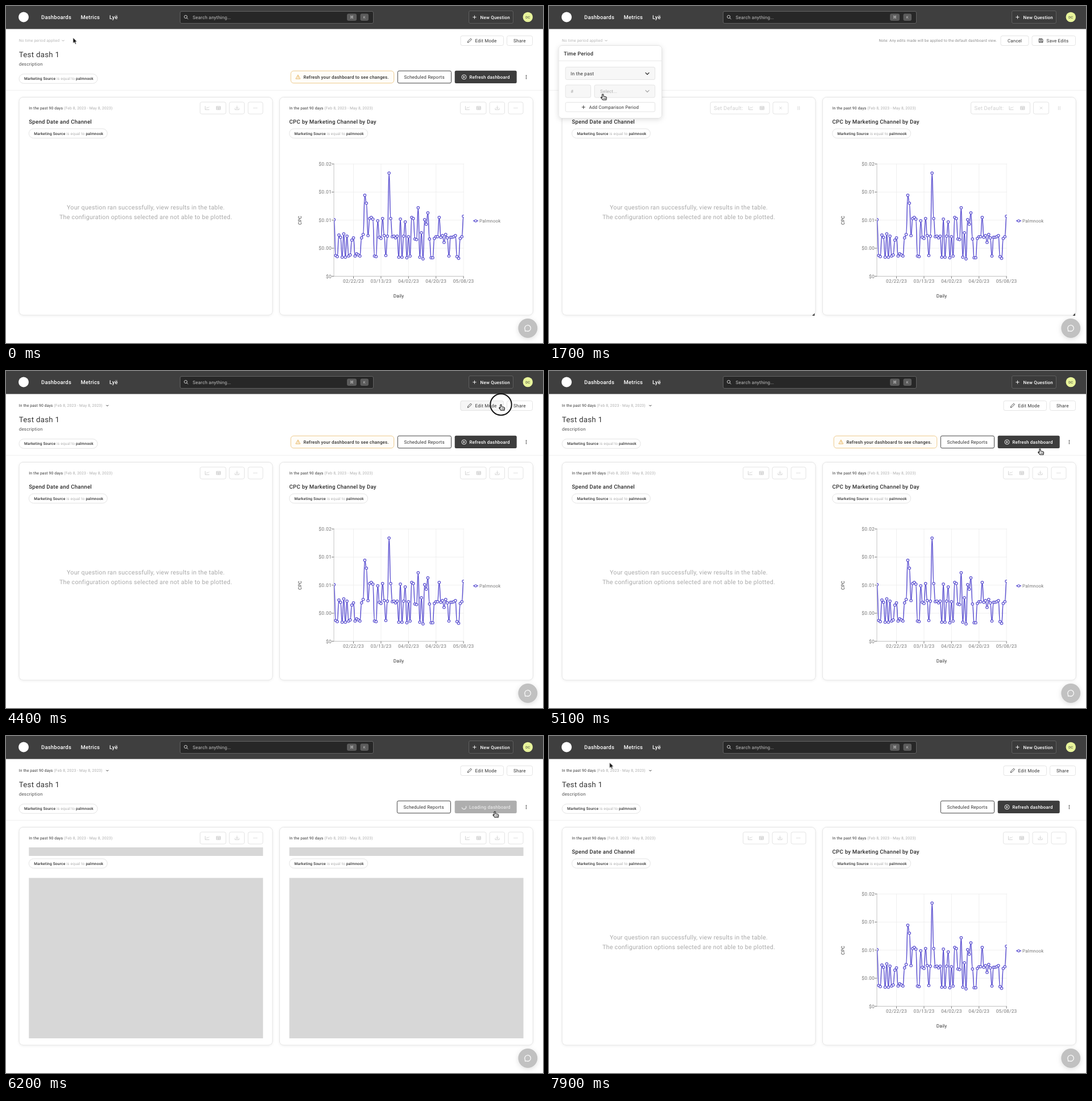
An HTML page for the animation above (8 s loop, 945 px wide and 593 px high).

```html
<!DOCTYPE html>
<html lang="en">
<head>
<meta charset="utf-8">
<title>Dashboard time period</title>
<style>
html, body { margin: 0; width: 100%; height: 100%; overflow: hidden; background: #fff; }
svg { display: block; width: 945px; height: 593px; font-family: Roboto, Inter, sans-serif; text-rendering: geometricPrecision; }
text { letter-spacing: .025em; }
.m { font-weight: 500; }
.soft { fill: #acacac; font-weight: 400; }
.line { fill: none; stroke-linecap: round; stroke-linejoin: round; }
#cursor { animation: travel 8s linear infinite; }
#reports { animation: nudge 8s step-end infinite; }
#spin { animation: spin 1s linear infinite; transform-origin: 806px 125px; }
@keyframes spin { to { transform: rotate(360deg); } }
@keyframes nudge {
  77.5% { transform: translate(-1px, 0); }
  87.5% { transform: none; }
}
@keyframes travel {
  0% { transform: translate(114px, 55.5px); }
  1.25% { transform: translate(500px, 58px); }
  2.5%, 3.75% { transform: translate(845px, 60px); }
  5% { transform: translate(300px, 60px); }
  6.25%, 11.25% { transform: translate(98px, 62px); }
  13.75%, 16.25% { transform: translate(110px, 118px); }
  18.75% { transform: translate(100px, 142px); }
  21.25% { transform: translate(95px, 155px); }
  22.5%, 28.75% { transform: translate(57px, 151px); }
  30%, 31.25% { transform: translate(120px, 151px); }
  33.75%, 36.25% { transform: translate(112px, 176px); }
  37.5% { transform: translate(300px, 140px); }
  41.25% { transform: translate(906px, 65px); }
  42.5%, 48.75% { transform: translate(912px, 62px); }
  53.75%, 58.75% { transform: translate(871px, 59px); }
  63.75% { transform: translate(864px, 137px); }
  66.25%, 77.5% { transform: translate(862px, 133px); }
  82.5%, 96.25% { transform: translate(151px, 97px); }
  97.5% { transform: translate(168px, 68px); }
  98.75%, 100% { transform: translate(106.5px, 46.5px); }
}
</style>
</head>
<body>
<script>
const LOOP = 8000;
const INK = '#333', PALE = '#c9c9c9', EDGE = '#e4e4e4', PLOT = '#5a4fd0';

// Visible time spans in ms for each layer
const ready = [[0, 300], [3900, 6200], [7000, LOOP]];
const spans = {
  noPeriod: [[0, 3000]],
  period: [[3000, LOOP]],
  view: [[0, 300], [3900, LOOP]],
  edit: [[300, 3900]],
  notice: [[0, 300], [3900, 6200]],
  readyBack: ready,
  readyLabel: ready,
  loading: [[6200, 7000]],
  editHover: [[4000, 4800]],
  refreshHover: [[5800, 6200]],
  leftLoad: [[6200, 6900]],
  rightLoad: [[6200, 6700]],
  popShort: [[700, 1500]],
  popFull: [[1500, 3000]],
  modeMenu: [[1200, 1500]],
  unitMenu: [[2400, 2700]],
  hash: [[1500, 2100]],
  nine: [[2100, 2200]],
  ninety: [[2200, 3000]],
  noUnit: [[1500, 2700]],
  unit: [[2700, 3000]],
  arrow: [[0, 200], [7800, LOOP]],
  hand: [[200, 7800]],
  ring: [[200, 300], [500, 700], [3400, 3700], [4300, 4700], [5800, 6200]],
};

function visibilityRule([id, list]) {
  const at = (ms, on) => `${ms / LOOP * 100}%{visibility:${on ? 'visible' : 'hidden'}}`;
  let frames = list[0][0] ? at(0, false) : '';
  for (const [from, to] of list) frames += at(from, true) + (to < LOOP ? at(to, false) : '');
  return `@keyframes ${id}{${frames}}#${id}{animation:${id} ${LOOP}ms step-end infinite}`;
}

const layer = (id, ...parts) => `<g id="${id}">${parts.join('')}</g>`;
const text = (x, mid, size, str, fill = INK, more = '') =>
  `<text x="${x}" y="${mid + size * .355}" font-size="${size}" fill="${fill}" ${more}>${str}</text>`;
const bold = (x, mid, size, str, fill = INK) => text(x, mid, size, str, fill, 'class="m"');
const centered = (x, mid, size, str, fill) => text(x, mid, size, str, fill, 'text-anchor="middle"');
const box = (x, y, w, h, r = 3, stroke = EDGE, fill = '#fff', more = '') =>
  `<rect x="${x}" y="${y}" width="${w}" height="${h}" rx="${r}" fill="${fill}" stroke="${stroke}" ${more}/>`;
const path = (d, stroke = INK, width = 1, more = '') =>
  `<path class="line" d="${d}" stroke="${stroke}" stroke-width="${width}" ${more}/>`;
const dot = (x, y, r, fill, stroke = 'none', width = 1, more = '') =>
  `<circle cx="${x}" cy="${y}" r="${r}" fill="${fill}" stroke="${stroke}" stroke-width="${width}" ${more}/>`;
const move = (x, y, str) => `<g transform="translate(${x} ${y})">${str}</g>`;

const chevron = (x, y, s = 1.7, color = INK, w = 1) => path(`M${x - s} ${y - s / 2}l${s} ${s} ${s} ${-s}`, color, w);
const plus = (x, y, color) => path(`M${x - 2.7} ${y}h5.4M${x} ${y - 2.7}v5.4`, color, .9);
const plotIcon = (x, y) => path(`M${x - 3.5} ${y - 3}v6h7M${x - 2} ${y + 1}l2-2 1.3 1 2-2`, PALE, .8);
const tableIcon = (x, y) => path(`M${x - 3.3} ${y - 2.8}h6.6v5.6h-6.6zM${x - 3.3} ${y - 1}h6.6m-6.6 1.9h6.6M${x} ${y - 1}v3.8`, PALE, .9);
const dots = (x, y, dx, dy, r, color) => [-1, 0, 1].map(i => dot(x + i * dx, y + i * dy, r, color)).join('');

const chip = (x, y) => box(x, y, 138, 16.5, 8.2) + bold(x + 9, y + 8.2, 6.65,
  'Marketing Source <tspan class="soft">is equal to</tspan> palmnook');
const range = (x, y) => text(x, y, 6.75, 'In the past 90 days <tspan class="soft">(Feb 8, 2023 - May 8, 2023)</tspan>');

const header = () => [
  '<rect width="945" height="40.5" fill="#3f3f3f"/>',
  dot(31, 19.5, 9, '#fff'),
  bold(62, 20, 9.45, 'Dashboards', '#fff'), bold(131.5, 20, 9.45, 'Metrics', '#fff'), bold(182, 20, 9.45, 'Lyë', '#fff'),
  box(306.5, 9.5, 340, 21, 2.5, '#626262', '#272727'),
  dot(316.2, 19, 2.6, 'none', '#ddd', .9), path('M318.2 21l2 2', '#ddd', .9),
  text(328.5, 20, 8.1, 'Search anything...', '#c2c2c2'),
  box(600, 13.5, 17, 12.5, 3, 'none', '#5c5c5c'), centered(608.5, 20, 7, '⌘', '#ccc'),
  box(623.5, 13.5, 14.5, 12.5, 3, 'none', '#5c5c5c'), centered(630.7, 20, 6, 'K', '#ccc'),
  box(814.5, 8.5, 78, 22, 2.5, '#5e5e5e', '#3b3b3b'), plus(824.5, 19.7, '#fff'),
  bold(834.5, 20, 8, 'New Question', '#fff'),
  dot(918.3, 19.5, 8.7, '#e8f49b'), centered(918.3, 19.5, 5.8, 'DC', INK),
].join('');

const card = (x, title) => [
  box(x, 160.5, 446, 383.5, 7, '#e3e3e3', '#fff', 'filter="url(#lift)"'),
  range(x + 17.3, 179.3), bold(x + 17.3, 203.3, 9.65, title, '#2b2b2b'), chip(x + 17.3, 216),
].join('');

const viewTools = dx => move(dx, 0, [
  box(341.5, 169, 45.5, 21), plotIcon(354, 179.5), tableIcon(374, 179.5),
  box(393, 169, 26.5, 21), path('M403 180v2.5h7V180M406.5 176v4.5m-1.8-1.6l1.8 1.8 1.8-1.8', PALE, .8),
  box(426, 169, 26, 21), dots(438.8, 179.5, 2.5, 0, .7, PALE),
].join(''));

const editTools = dx => move(dx, 0, [
  box(284, 169, 104, 21), text(290, 179.5, 9.5, 'Set Default:', '#cfcfcf'),
  plotIcon(355, 179.5), tableIcon(375, 179.5),
  box(394, 169, 27, 21), path('M405.7 177.7l3.6 3.6m0-3.6l-3.6 3.6', PALE, .8),
  dots(438, 179.5, 0, 2.4, .7, '#bbb'), dots(440.7, 179.5, 0, 2.4, .7, '#bbb'),
  '<path d="M467.5 540.5v4.5h-4.5z" fill="#444"/>',
].join(''));

const block = (x, y, w, h, fill, r = 0) => `<rect x="${x}" y="${y}" width="${w}" height="${h}" rx="${r}" fill="${fill}"/>`;
const loadingCard = (x, id) => layer(id,
  block(x - 4, 194, 419, 20, '#fff'), block(x - 4, 236, 419, 300, '#fff'),
  block(x, 196, 412, 15, '#d7d7d7'), block(x, 249.7, 412, 282.3, '#d7d7d7'));

function chart() {
  const ys = [376, 439, 441, 403, 407, 442, 401, 442, 405, 440, 438, 412, 408, 440, 436, 438, 440, 408, 402, 333,
    347, 404, 374, 372, 375, 440, 441, 378, 407, 409, 374, 404, 439, 405, 294, 374, 406, 405, 408, 405,
    442, 375, 442, 405, 380, 443, 406, 440, 372, 374, 410, 411, 355, 442, 399, 445, 376, 384, 364, 410,
    443, 443, 409, 406, 406, 372, 407, 404, 416, 402, 408, 440, 407, 407, 406, 404, 441, 444, 409, 406, 370];
  const px = i => 577.3 + i * 2.847;
  const curve = ys.slice(1).reduce((d, y, i) => {
    const mid = px(i + .5);
    return `${d}C${mid} ${ys[i]} ${mid} ${y} ${px(i + 1)} ${y}`;
  }, `M${px(0)} ${ys[0]}`);
  const rows = ['$0.02', '$0.01', '$0.01', '$0.00', '$0'].map((label, i) => {
    const y = 278 + i * 49.4;
    return path(`M577 ${y}h228.5`, '#ececec', .8) + path(`M573.5 ${y}h3.5`, '#777')
      + text(573, y, 8.6, label, '#777', 'text-anchor="end"');
  });
  const columns = ['02/22/23', '03/13/23', '04/02/23', '04/20/23', '05/08/23'].map((label, i) => {
    const x = 611.5 + i * 48.4;
    return path(`M${x} 278v197.6`, '#ececec', .8) + path(`M${x} 475.6v3.5`, '#777') + centered(x, 484.5, 8.4, label, '#777');
  });
  return [...rows, ...columns,
    path('M577 278v197.6h228.5', '#bdbdbd', .9),
    `<g clip-path="url(#plot)">${path(curve, PLOT, 1.5)}${ys.map((y, i) => dot(px(i), y, 2.2, '#fff', PLOT, 1.2)).join('')}</g>`,
    move(517, 377, `<g transform="rotate(-90)">${centered(0, 0, 8, 'CPC', INK)}</g>`),
    centered(691, 510.5, 8.2, 'Daily', INK),
    path('M822.5 378h8', PLOT, 1.4), dot(826.5, 378, 2, '#fff', PLOT, 1.2), text(833, 378, 8, 'Palmnook', '#777'),
  ].join('');
}

const viewBar = () => layer('view',
  chip(23, 119.7),
  box(800, 52.5, 75.5, 17), layer('editHover', box(800, 52.5, 75.5, 17, 3, EDGE, '#f6f6f6')),
  path('M812.5 64l.6-2.3 4.6-4.6 1.7 1.7-4.6 4.6z', INK, .9), text(825.5, 61, 8.1, 'Edit Mode'),
  box(881.5, 52.5, 45, 17), text(893, 61, 8.1, 'Share'),
  layer('reports', box(689.3, 114.2, 94.2, 21.5, 2.5, '#444'), text(700.5, 125, 8.1, 'Scheduled Reports')),
  dots(915.5, 125, 0, 2.6, .85, INK), viewTools(0), viewTools(458));

const refreshBack = fill => block(789.7, 113.8, 109, 22.2, fill, 2.5);
const refreshBar = () => [
  layer('notice', box(501.2, 114.2, 181.5, 21.5, 5, '#edc98b', '#fffdf8'),
    path('M514 121.5l3.7 6.6h-7.4zM514 124v1.6m0 1.1v.1', '#e0a23c', .8),
    bold(523.5, 125, 7.95, 'Refresh your dashboard to see changes.')),
  layer('readyBack', refreshBack('#3d3d3d')),
  layer('refreshHover', refreshBack('#202020')),
  layer('readyLabel', dot(806, 125, 4, 'none', '#fff', .9), '<path d="M804.8 123l3 2-3 2z" fill="#fff"/>',
    bold(815.5, 125, 8, 'Refresh dashboard', '#fff')),
  layer('loading', refreshBack('#aeaeae'),
    path('M806 121.2a3.8 3.8 0 0 1 0 7.6', '#fff', 1.1, 'id="spin"'),
    text(815, 125, 8.1, 'Loading dashboard', '#f4f4f4')),
].join('');

const editBar = () => layer('edit',
  box(23, 119.7, 25, 16.5, 8.2), path('M32 125.3h6l-2.3 2.8v2.6l-1.4-.8v-1.8z', INK, .9), chip(60, 119.7),
  text(580.5, 61, 6.63, 'Note: Any edits made will be applied to the default dashboard view.', '#8c8c8c'),
  box(795, 52.5, 49, 17), text(807, 61, 7.9, 'Cancel'),
  box(850, 52.5, 76.5, 17),
  path('M862.7 57.7h5l1.3 1.3v5h-6.3zM864.2 57.7v2h2.8v-2M864.2 64v-2.4h3.2v2.4', INK, .9),
  text(875.5, 61, 8, 'Save Edits'), editTools(0), editTools(458.5));

const field = (x, y, w, h = 22) => box(x, y, w, h, 2.5, EDGE, '#f7f7f7');
const panel = h => box(17, 69.5, 181.5, h, 6, '#e3e3e3', '#fff', 'filter="url(#pop)"')
  + bold(26, 83.3, 9.15, 'Time Period', '#2b2b2b') + path('M17 96.5h181', '#e8e8e8', .9)
  + field(29, 107.5, 157.5) + chevron(173, 119, 3, INK, 1.2);
const menu = (id, x, y, w, items) => layer(id,
  box(x, y, w, items.length * 18 + 6, 3, EDGE, '#fff', 'filter="url(#pop)"'),
  ...items.map((item, i) => text(x + 10, y + 12 + i * 18, 8, item)));

const popover = () => [
  layer('popShort', panel(72), text(38, 118.7, 8.2, 'Select...', '#aaa')),
  layer('popFull', panel(128), text(38, 118.7, 8.3, 'In the past'),
    field(29, 139, 44.5), field(80, 139, 106.5), chevron(173, 150, 3, '#aaa', 1.2),
    box(29, 169.5, 157.5, 16.5, 2.5), plus(60.7, 178, INK), text(70.5, 178, 7.9, 'Add Comparison Period')),
  layer('hash', text(38, 150, 8, '#', '#aaa')),
  layer('nine', text(38, 150, 8.2, '9')), layer('ninety', text(38, 150, 8.2, '90')),
  layer('noUnit', text(90, 149.7, 8, 'Select...', '#aaa')), layer('unit', text(90, 149.7, 8.2, 'days')),
  menu('modeMenu', 29, 132, 158, ['In the past', 'Between', 'Before', 'After']),
  menu('unitMenu', 80, 163.5, 107, ['days', 'weeks', 'months']),
].join('');

const pointer = () => layer('cursor',
  layer('ring', dot(0, 0, 17.4, 'none', '#fff', 1), dot(0, 0, 18.7, 'none', '#111', 2)),
  layer('arrow', '<path d="M0 0V10.3L2.4 8.1 4 11.7 5.8 10.9 4.2 7.4H7.3Z" fill="#111" stroke="#fff" stroke-width=".8"/>'),
  layer('hand', '<path d="M-1.1 .8Q0-.7 1.1.8V4L5.3 4.8Q6.7 5.2 6.6 6.8L5.9 10.3H.2L-2.9 6.7Q-3.6 5.2-2.1 5.4L-1.1 6.3Z" fill="#fff" stroke="#111" stroke-width="1.1" stroke-linejoin="round"/>',
    path('M1.6 6.6v2.2m1.6-2.2v2.2m1.5-2.2v2.2', '#111', .6)));

const defs = `<defs>
  <filter id="lift"><feDropShadow dx="0" dy="1" stdDeviation="2" flood-opacity=".06"/></filter>
  <filter id="pop" x="-30%" y="-30%" width="160%" height="160%"><feDropShadow dx="0" dy="2" stdDeviation="4" flood-opacity=".13"/></filter>
  <clipPath id="plot"><path d="M577 270h228.7v210H577z"/></clipPath>
</defs>`;

const chat = () => dot(918.3, 567, 17, '#c1c1c1', 'none', 0, 'filter="url(#pop)"')
  + path('M913.6 572.2l-.3-3a5.3 5.3 0 1 1 2.6 2.6z', '#fff', 1.2);

document.head.insertAdjacentHTML('beforeend', `<style>${Object.entries(spans).map(visibilityRule).join('')}</style>`);
document.body.innerHTML = `<svg viewBox="0 0 945 593">${[
  defs, header(),
  layer('noPeriod', text(22.7, 60.8, 6.75, 'No time period applied', '#b5b5b5'), chevron(100.5, 61, 1.7, '#aaa')),
  layer('period', range(22.7, 60.8), chevron(178.3, 61)),
  text(22.7, 85.5, 13.2, 'Test dash 1'), text(22.7, 102, 8, 'description', '#555'),
  path('M0 148.3h945', '#ececec', .9),
  card(23, 'Spend Date and Channel'), card(481.3, 'CPC by Marketing Channel by Day'),
  centered(246, 354.5, 10.65, 'Your question ran successfully, view results in the table.', '#a9a9a9'),
  centered(246, 371.3, 10.65, 'The configuration options selected are not able to be plotted.', '#a9a9a9'),
  chart(), viewBar(), refreshBar(), editBar(),
  loadingCard(40.3, 'leftLoad'), loadingCard(498.6, 'rightLoad'),
  popover(), chat(), pointer(),
].join('')}</svg>`;
</script>
</body>
</html>
```
